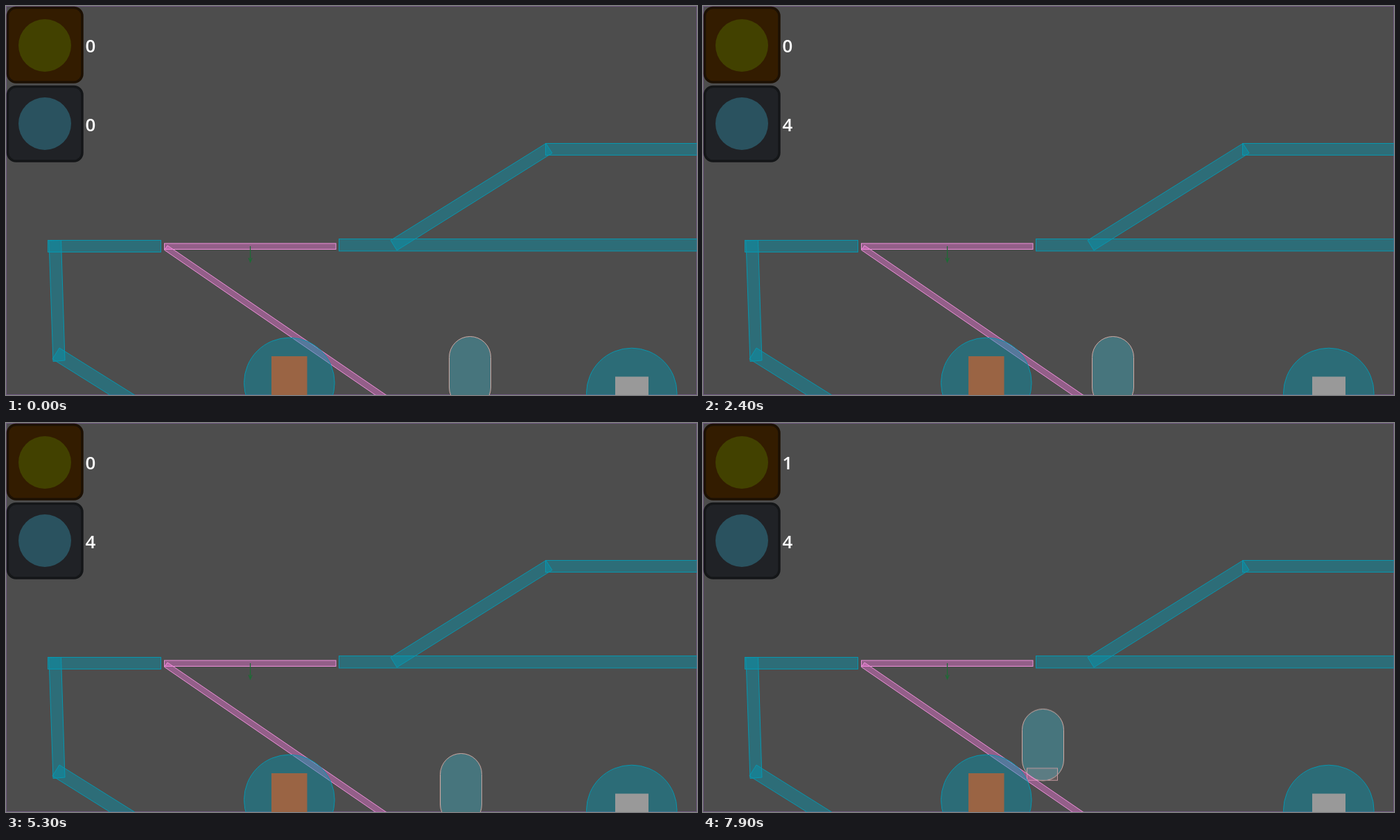
Write an HTML page without scripts that moves like this. It is 997x562 px and loops after 8000 ms.

```html
<!DOCTYPE html>
<html lang="en">
<head>
<meta charset="utf-8">
<title>Platform room</title>
<style>
html, body { margin: 0; width: 100%; height: 100%; overflow: hidden; background: #4d4d4d; }
svg { display: block; width: 997px; height: 562px; }
text { font: 600 26px "Open Sans", "Noto Sans", sans-serif; fill: #fff; }
.wall { fill: rgba(0, 153, 179, .42); stroke: #0896ae; stroke-width: 1; }
.plank { fill: rgba(246, 122, 222, .42); stroke: #ee90da; stroke-width: 1; }
.body { fill: #47757d; stroke: #cfa9a3; stroke-width: 1; }
.feet { fill: rgba(220, 160, 170, .14); stroke: #c39a9f; stroke-width: 1; }
.arrow { fill: none; stroke: #1d6b35; stroke-width: 1.2; }

/* each leg jumps once per 100 ms tick */
#hero { animation: walk 8s steps(1, start) infinite; }
@keyframes walk {
  0% { transform: translate(639px, 477px); }
  2.5% { transform: translate(639px, 477px); animation-timing-function: steps(7, start); }
  11.25% { transform: translate(828px, 477px); }
  12.5%, 17.5% { transform: translate(838px, 477px); }
  18.75% { transform: translate(816px, 477px); animation-timing-function: steps(8, start); }
  28.75% { transform: translate(600px, 477px); }
  30% { transform: translate(573px, 477px); }
  31.25%, 41.25% { transform: translate(561px, 477px); }
  42.5% { transform: translate(574px, 477px); animation-timing-function: steps(8, start); }
  52.5% { transform: translate(790px, 477px); }
  53.75% { transform: translate(807px, 477px); }
  55% { transform: translate(834px, 477px); }
  56.25% { transform: translate(851px, 477px); }
  57.5% { transform: translate(843px, 477px); animation-timing-function: steps(5, start); }
  63.75% { transform: translate(708px, 477px); animation-timing-function: steps(5, start); }
  70% { transform: translate(571.5px, 477px); }
  71.25% { transform: translate(551.5px, 474.4px); animation-timing-function: steps(3, start); }
  75% { transform: translate(499px, 438.5px); }
  76.25% { transform: translate(488px, 431px); }
  78.75% { transform: translate(488px, 431px); animation-timing-function: steps(4, start); }
  83.75% { transform: translate(418px, 383px); }
  85% { transform: translate(409px, 377px); }
  86.25% { transform: translate(409px, 377px); animation-timing-function: steps(5, start); }
  92.5% { transform: translate(519px, 452px); }
  93.75% { transform: translate(540px, 466.5px); }
  95% { transform: translate(531px, 460.4px); animation-timing-function: steps(4, start); }
  100% { transform: translate(460px, 412.7px); }
}

.num { animation: 8s step-end infinite; }
#top0 { animation-name: topOff; }
#top1 { animation-name: topOn; }
#low0 { animation-name: lowOff; }
#low4 { animation-name: lowOn; }
@keyframes topOff { 0% { opacity: 1; } 77.5%, 100% { opacity: 0; } }
@keyframes topOn { 0% { opacity: 0; } 77.5%, 100% { opacity: 1; } }
@keyframes lowOff { 0% { opacity: 1; } 12.5%, 100% { opacity: 0; } }
@keyframes lowOn { 0% { opacity: 0; } 12.5%, 100% { opacity: 1; } }
</style>
</head>
<body>
<svg viewBox="0 0 997 562">
  <rect width="997" height="562" fill="#4d4d4d"/>
  <rect x=".5" y=".5" width="996" height="561" fill="none" stroke="#6e587f"/>

  <g class="wall">
    <rect x="60.5" y="338.5" width="163" height="17"/>
    <path d="M62 339 L79.500 338.500 L85 512 L68 513.500Z"/>
    <path d="M77 494 L200 571 L190 587 L67 510Z"/>
    <rect x="480.500" y="336.500" width="530" height="17.500"/>
    <path d="M555 338.500 L779 198.500 L788 212.500 L564 353Z"/>
    <rect x="778.500" y="198.500" width="230" height="17"/>
  </g>

  <g id="hero">
    <rect class="body" x=".5" y=".5" width="60" height="103.500" rx="30"/>
    <rect class="feet" x="7.500" y="86" width="44" height="17.500"/>
  </g>

  <g class="plank">
    <rect x="228.500" y="343" width="247.500" height="8.500"/>
    <path d="M233 346 L562 571.300 L557 578.600 L228.500 352.500Z"/>
  </g>
  <path class="arrow" d="M352.500 347 V370 M350 364 L352.500 370 L355 364"/>

  <g class="wall">
    <circle cx="408.800" cy="544.500" r="65.300"/>
    <circle cx="902.800" cy="559.500" r="65.300"/>
  </g>
  <rect x="383" y="506" width="51.500" height="60" fill="#9a6444"/>
  <rect x="879" y="535.500" width="48" height="30" fill="#999"/>

  <g stroke-width="3.500">
    <rect x="2.500" y="2.500" width="107.500" height="107.500" rx="12" fill="#331c00" stroke="#1c1003"/>
    <rect x="2.500" y="116.500" width="107.500" height="107.500" rx="12" fill="#202226" stroke="#141618"/>
  </g>
  <circle cx="56" cy="57" r="38" fill="#424100"/>
  <circle cx="56" cy="170" r="38" fill="#2a525f"/>

  <g class="score">
    <text class="num" id="top0" x="114.500" y="66.500">0</text>
    <text class="num" id="top1" x="114.500" y="66.500">1</text>
    <text class="num" id="low0" x="114.500" y="180.500">0</text>
    <text class="num" id="low4" x="114.500" y="180.500">4</text>
  </g>
</svg>
</body>
</html>
```
